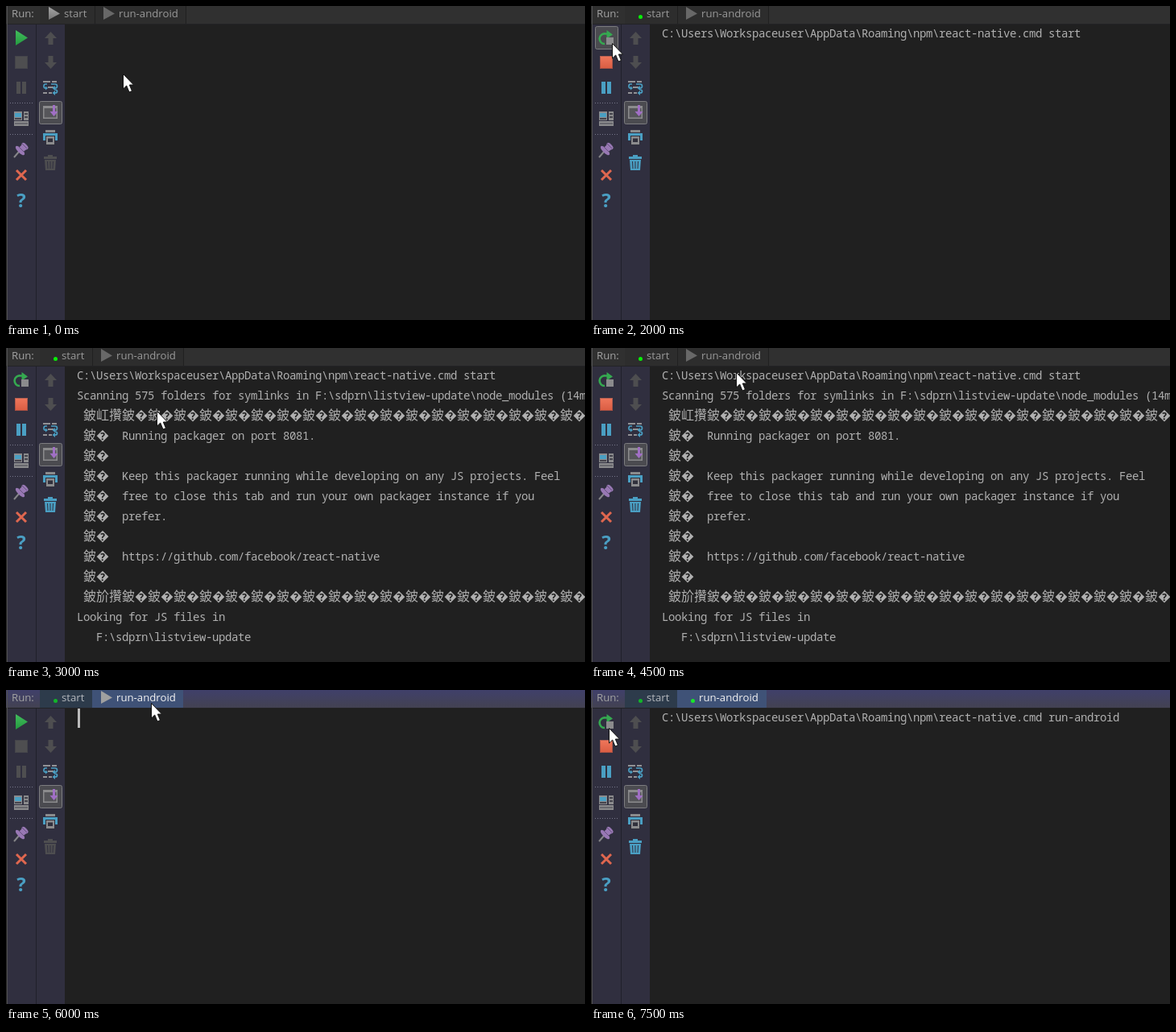
Write an HTML page that moves like this. It is 719 px wide and 390 px high and loops after 8000 ms.

```html
<!DOCTYPE html>
<html lang="en">
<head>
<meta charset="utf-8">
<title>Run console</title>
<style>
html, body { margin: 0; width: 100%; height: 100%; overflow: hidden; background: #202020; }
svg { display: block; width: 719px; height: 390px; }
.ui { font: 13.2px "Open Sans", "Noto Sans", sans-serif; }
.console { font: 14px "Noto Sans Mono", "DejaVu Sans Mono", monospace; fill: #b0b0b0; }
.wide { font: 16px "Noto Sans Mono CJK SC", "Noto Sans CJK SC", monospace; }
.grey { fill: #8b8b8d; }
.off { fill: #4e4e50; }
.blue { fill: #4a9fc3; }
.line { fill: none; stroke-width: 2; }
.button { fill: #4b4b50; stroke: #7d7d80; }
.live { display: none; }
.running .live { display: inline; }
.running .still { display: none; }
.stop, .pause, .trash { fill: #4e4e50; }
.running .stop { fill: url(#red); }
.running .pause, .running .trash { fill: #4a9fc3; }
</style>
</head>
<body>
<svg id="stage" viewBox="0 0 719 390">
  <defs>
    <linearGradient id="green" x2="0" y2="1"><stop stop-color="#42bd5c"/><stop offset="1" stop-color="#249a40"/></linearGradient>
    <linearGradient id="red" x2="0" y2="1"><stop stop-color="#f0775c"/><stop offset="1" stop-color="#d95c42"/></linearGradient>
    <linearGradient id="silver" x2="0" y2="1"><stop stop-color="#a5a5a5"/><stop offset="1" stop-color="#777"/></linearGradient>
    <linearGradient id="focus" x2="0" y2="1"><stop stop-color="#40406a"/><stop offset="1" stop-color="#434252"/></linearGradient>
  </defs>

  <rect width="719" height="390" fill="#202020"/>
  <g id="header" class="ui"></g>
  <path d="M2 23H73V390H2Z" fill="#302f3f"/>
  <path d="M37.5 23V390" stroke="#20202a"/>
  <path d="M1.5 0V390" stroke="#505052"/>
  <path d="M5 120.500H34M5 159.500H34" stroke="#77778a" stroke-dasharray="1 2"/>

  <!-- Left column -->
  <rect id="hover" class="button" x="5.5" y="25.5" width="28" height="28" rx="2"/>
  <path class="still" d="M12 30L27 39.5L12 49Z" fill="url(#green)"/>
  <g class="live">
    <path class="line" d="M17 47A6.3 6.3 0 1 1 18 34.5H21" stroke="#35a950" style="stroke-width:2.6"/>
    <path d="M19.500 30L27 35.500L19.500 40.500Z" fill="#35a950"/>
    <path class="grey" d="M19 39H28V48H19Z"/>
  </g>
  <path class="stop" d="M11 62H27V78H11Z"/>
  <path d="M11.500 62.500H26.500V77.500H11.500Z" fill="none" stroke="#302f3f" stroke-opacity=".3"/>
  <path class="pause" d="M13 94H18V109H13ZM20 94H25V109H20Z"/>
  <path class="grey" d="M10 131H20V142H10ZM22 131H28V142H22ZM10 143H28V149H10Z"/>
  <path class="blue" d="M11 133H19V138H11Z"/>
  <path d="M11 139H19V141H11ZM23 133H27V135H23ZM23 137H27V139H23ZM11 145.500H27V146.500H11Z" fill="#45454e"/>
  <path class="line" d="M10 188L16 181" stroke="#858588"/>
  <g fill="#9878b4">
    <path d="M15 177L21 171L27 177L20 182Z"/>
    <ellipse rx="7.500" ry="2.800" transform="translate(17.500 179.500) rotate(45)"/>
    <ellipse rx="5" ry="2.600" transform="translate(23.500 174) rotate(45)"/>
  </g>
  <path class="line" d="M15 174L22 181M20 171L26 177" stroke="#65527d" style="stroke-width:1"/>
  <path class="line" d="M13 204L25 216M25 204L13 216" stroke="#e0674f" style="stroke-width:3"/>
  <text class="ui blue" x="19" y="250" text-anchor="middle" style="font-size:24px;font-weight:bold">?</text>

  <!-- Right column -->
  <path id="arrow" class="off" d="M55.500 32L63 40H58.500V48H52.500V40H48Z"/>
  <use href="#arrow" transform="matrix(1 0 0 -1 0 110)"/>
  <path class="line" d="M46 94H55M57 94H63M52 101H59M46 108H51M53 108H57" stroke="#929295"/>
  <path class="line" d="M56 97H61Q63.500 97 63.500 99.500T61 102H60M51 97H49Q47 97 47 99.500T49 102M61 104Q63.500 104 63.500 106T61 108H60" stroke="#4a9fc3" style="stroke-width:1.7"/>
  <path class="blue" d="M61 99V105L57.500 102ZM49 99.500V104.500L52 102ZM61 105V111L57.500 108Z"/>
  <rect class="button" x="41.500" y="118.500" width="28" height="28" rx="2"/>
  <path d="M46 124H64V140H46Z" fill="#8b8b8d"/>
  <path d="M47.500 127H62.500V138.500H47.500Z" fill="#56565a"/>
  <path d="M58 123H61V131H64.500L59.500 137L54.500 131H58Z" fill="#a06fc4"/>
  <path class="grey" d="M49 154H61V157H49Z"/>
  <path class="blue" d="M46 158H64V167H46Z"/>
  <path d="M49 161H61V173H49Z" fill="#30303c"/>
  <path class="grey" d="M50 162H60V172H50Z"/>
  <path d="M52 164.500H58V169H52Z" fill="#30303c"/>
  <path class="trash" d="M52 185H58V187H63V190H47V187H52ZM48 191H62L61 204H49Z"/>
  <path d="M51.500 193L52 202M55 193V202M58.500 193L58 202" stroke="#302f3f"/>

  <g class="console">
    <g id="command"></g>
    <g id="log"></g>
  </g>
  <path id="caret" d="M89 23H92V47H89Z" fill="#bbb"/>
  <path id="cursor" d="M.5 .5V19L4.700 15L8 23L11.500 21.500L8.300 14H13.500Z" fill="#fff" stroke="#111"/>
</svg>

<script>
const byId = id => document.getElementById(id);
const LOOP = 8000;
const CELL = 8, ROW = 25;
const PROMPT = "C:\\Users\\Workspaceuser\\AppData\\Roaming\\npm\\react-native.cmd ";
const LOST = "\ufffd";

// Pointer position from each time on, and whether it highlights the run button
const pointerSteps = [
  [0, 145, 84], [500, 21, 46, true], [1000, 21, 46], [2000, 26, 46, true],
  [2500, 165, 68], [3000, 187, 78], [4500, 180, 30], [5000, 180, 17],
  [5500, 180, 16], [6500, 40, 50], [7000, 22, 47, true], [7500, 22, 47]
];

// Every character sits in a terminal cell; wide ones take two
function cells(row, column, text) {
  const wide = text > "\u2fff";
  const xs = [...text].map((_, i) => 88 + (column + i * (wide ? 2 : 1)) * CELL);
  return `<text class="${wide ? "wide" : ""}" x="${xs.join(" ")}" y="${39 + row * ROW}">${text}</text>`;
}

function logText() {
  const border = ("鈹" + LOST).repeat(18);
  const body = {
    3: "Running packager on port 8081.",
    5: "Keep this packager running while developing on any JS projects. Feel",
    6: "free to close this tab and run your own packager instance if you",
    7: "prefer.",
    9: "https://github.com/facebook/react-native"
  };
  let out = cells(1, 0, "Scanning 575 folders for symlinks in F:\\sdprn\\listview-update\\node_modules (14ms)")
    + cells(2, 1, "鈹屸攢" + border) + cells(11, 1, "鈹斺攢" + border)
    + cells(12, 0, "Looking for JS files in") + cells(13, 3, "F:\\sdprn\\listview-update");
  for (let row = 3; row <= 10; row++) {
    out += cells(row, 1, "鈹" + LOST) + (body[row] ? cells(row, 7, body[row]) : "");
  }
  return out;
}

function tab(x, width, label, running, fill, color, iconFill) {
  const icon = running
    ? `<circle cx="${x + 19.5}" cy="13.5" r="2.5" fill="${iconFill}"/>`
    : `<path d="M${x + 11} 1L${x + 25} 9.500L${x + 11} 17Z" fill="${iconFill}"/>`;
  return `<path d="M${x} 0h${width}v22h${-width}Z" fill="${fill}"/>${icon}
    <text x="${x + (running ? 27 : 30)}" y="14" fill="${color}">${label}</text>`;
}

function header(startRunning, androidRunning, focused) {
  const split = startRunning ? 107 : 110;
  const width = androidRunning ? 111 : 113;
  const androidIcon = androidRunning ? "#19e52b" : focused ? "#a0a0a0" : "#686868";
  const startIcon = !startRunning ? "url(#silver)" : focused ? "#12b52a" : "#08ef08";
  return `<path d="M0 0H719V22H0Z" fill="${focused ? "url(#focus)" : "#303030"}"/>
    <text x="7" y="14" fill="#a4a4a4">Run:</text>`
    + tab(42, split - 42, "start", startRunning, focused ? "#2d3b4b" : "#2d2d2d", focused ? "#b4b8bd" : "#999", startIcon)
    + tab(split, width, "run-android", androidRunning, focused ? "#3f5277" : "#2d2d2d", focused ? "#f2f2f2" : "#999", androidIcon)
    + (focused ? "" : `<path d="M${split}.5 0V22M${split + width}.5 0V22" stroke="#202020"/>`)
    + `<path d="M0 22.5H719" stroke="#232326"/>`;
}

function show(id, visible) {
  byId(id).style.display = visible ? "" : "none";
}

let drawnStep = -1;
function render() {
  const step = Math.floor(performance.now() % LOOP / 500);
  if (step !== drawnStep) {
    drawnStep = step;
    const time = step * 500;
    const focused = time >= 6000;
    const androidRunning = time >= 7500;
    const running = androidRunning || (time >= 1000 && !focused);
    const [, x, y, hover] = pointerSteps.findLast(s => s[0] <= time);

    byId("stage").classList.toggle("running", running);
    byId("header").innerHTML = header(time >= 1000, androidRunning, focused);
    byId("command").innerHTML = running ? cells(0, 0, PROMPT + (focused ? "run-android" : "start")) : "";
    byId("cursor").setAttribute("transform", `translate(${x} ${y})`);
    show("hover", hover);
    show("log", time >= 3000 && !focused);
    show("caret", time === 6000 || time === 7000);
  }
  requestAnimationFrame(render);
}

byId("log").innerHTML = logText();
render();
</script>
</body>
</html>
```
